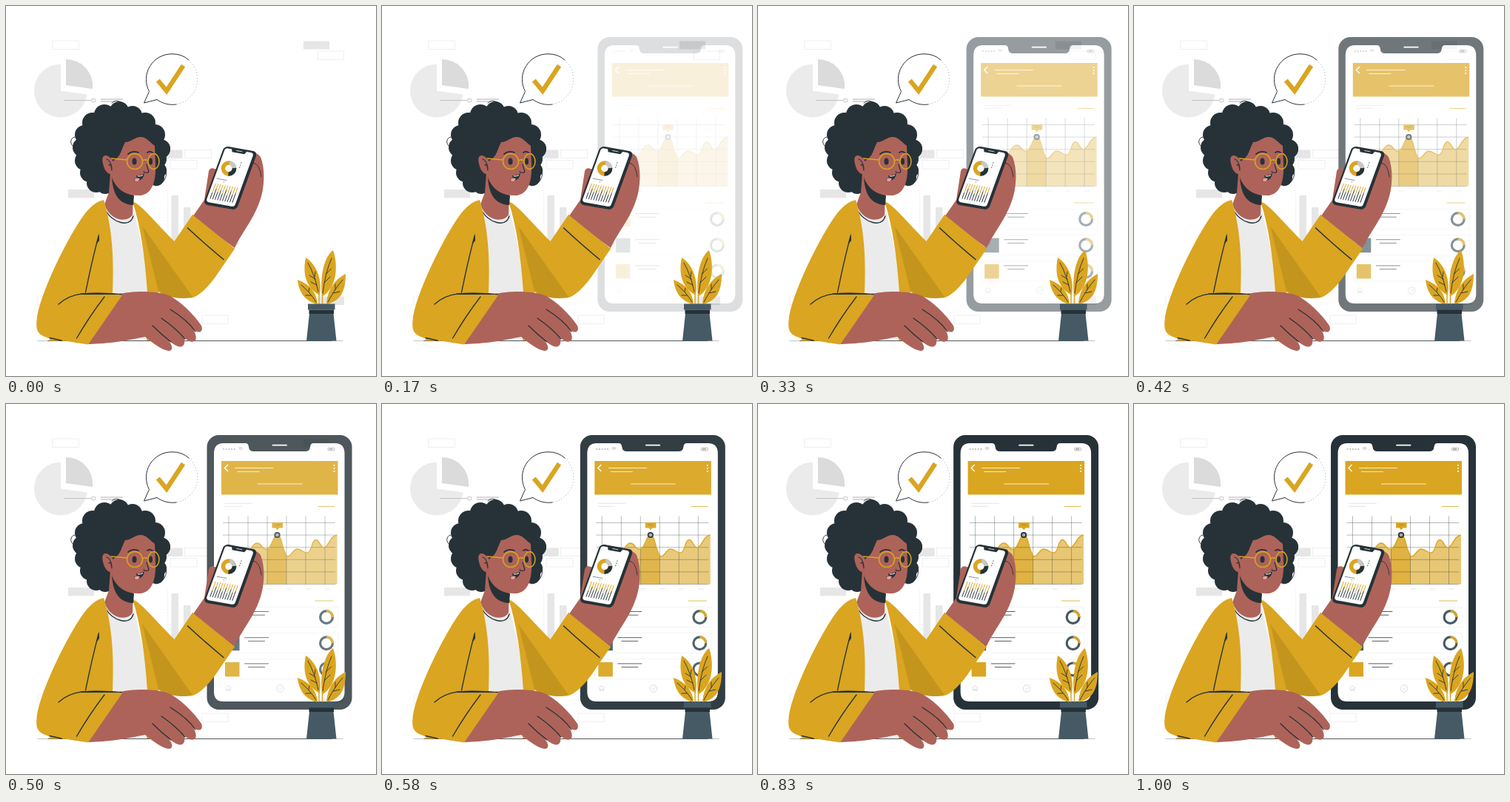
These frames come from a looping animation (500 by 500 pixels, 1.04 s). An HTML page:

```html
<!DOCTYPE html>
<html lang="en">
<head>
<meta charset="utf-8">
<title>Checking statistics</title>
<style>
  html, body { margin: 0; width: 100%; height: 100%; overflow: hidden; background: #fff; }
  svg { display: block; width: 100vw; height: 100vh; }
  .gold { fill: #daa520; }
  .dark { fill: #263238; }
  .slate { fill: #455a64; }
  .skin { fill: #ad6359; }
  .pale { fill: #ebebeb; }
  .white { fill: #fff; }
  .line { fill: none; stroke: #263238; stroke-linecap: round; stroke-linejoin: round; }
  .frame { fill: none; stroke: #e9e9e9; stroke-width: .7; }
  .tint { fill: none; stroke: #daa520; }
  .light { fill: none; stroke: #fff; }
</style>
</head>
<body>
<svg viewBox="0 0 500 500">
  <!-- backdrop -->
  <g class="pale">
    <path d="M74 78.5A36 36 0 1 0 109.6 119.5L74 114.5Z"/>
    <path d="M81 72A36 36 0 0 1 117 112L81 107Z" fill="#dbdbdb"/>
    <path d="M402 47.5h35v11h-35zM84 248h35v11.3H84zM203 194.5h35.5v11.5h-35.5zM422 392.5h35v11.5h-35z" fill="#e6e6e6"/>
    <path d="M223.5 256h9.5v62h-9.5zM240 272h9.5v46H240zM304 311h10v11.5h-10z" fill="#e6e6e6"/>
  </g>
  <path class="frame" d="M62.5 47H98.5V58.5H62.5zM421.5 61h35v11.5h-35zM241.5 194.5h36v11h-36zM222 208.5h36V220h-36zM265 418h35v11.5h-35zM43 392h36v12H43z"/>
  <path class="frame" d="M218.5 249V318" stroke-dasharray="2 2"/>
  <g fill="none" stroke="#bdbdbd" stroke-width=".9">
    <path d="M78 127.5h37.5"/><circle cx="118.3" cy="127.5" r="2.6"/>
    <path d="M128 126h30M128 129h19" stroke="#a6a6a6"/>
  </g>
  <path class="line" stroke-width=".7" d="M57 452.5H440"/>
  <path class="line" stroke-width=".3" d="M43 452.5H455"/>

  <!-- speech bubble -->
  <circle class="white" cx="224" cy="99" r="34.5"/>
  <path class="line" style="fill:#fff" d="M230 133C219 134.5 211 131 204 126.5L186.5 131L193.5 115.5A34.5 34.5 0 0 1 224 64.8Q238 64.5 247 73"/>
  <path class="line" stroke-width=".4" stroke-dasharray=".4 3.6" d="M247 73A34.5 34.5 0 0 1 230 133"/>
  <path class="tint" stroke-width="6.3" d="M205.3 100.5L217 114.8L239.5 80.5"/>

  <!-- large phone -->
  <g id="phone">
    <rect class="dark" x="266" y="42" width="196" height="371" rx="16"/>
    <path class="white" d="M288 53H318Q322 53 322.5 58Q323 64 329 64H399Q405 64 405.5 58Q406 53 410 53H439Q452 53 452 67V389Q452 402 439 402H288Q275.5 402 275.5 389V67Q275.5 53 288 53Z"/>
    <path class="light" stroke-width="1.8" stroke-linecap="round" d="M355 55.7H373.5"/>
    <g fill="none" stroke="#b5b5b5">
      <path stroke-width="2.2" stroke-linecap="round" stroke-dasharray="0 3.7" d="M288.5 61H304"/>
      <path d="M308.5 60Q311.5 57.5 314.5 60M310 61.5Q311.5 60.2 313 61.5"/>
      <rect x="429.5" y="59.3" width="9" height="3.6" rx="1"/><path stroke-width="2" d="M431 61.1h5"/>
    </g>
    <rect class="gold" x="285.5" y="77" width="157.5" height="45.5"/>
    <path class="light" stroke-width="1.5" d="M294.5 82L290 86.5L294.5 91"/>
    <path class="light" stroke-width=".8" d="M304 86.5h52M307 91.5h30M334 108h61"/>
    <path class="light" stroke-width="2.1" stroke-linecap="round" stroke-dasharray="0 4" d="M438 83v8.5"/>
    <path fill="none" stroke="#dadada" stroke-width=".7" d="M290 134.3h38M290 138.3h23M294 250h8M320 250h8M347 250h8M373 250h8M399 250h8M425 250h8"/>
    <path class="tint" stroke-width=".8" d="M416 138.5h22.5M412 266h25"/>

    <path class="gold" opacity=".62" d="M296 236C309 236 315 223 321 206C327 188 334 184 340 192C343 197 347 197 350 194C355 189 356 177 361 177C367 177 367 194 373.5 205C379 209 382 196 388 196C394 196 397 202 402 201C408 200 407 184 413 183.5C418 183 419 194 424 194C431 193 432 178 442 177V243.5H296Z"/>
    <path class="gold" opacity=".6" d="M347.5 196C355 192 355 177 361 177C367 177 367 194 373.5 205V243.5H347.5Z"/>
    <path class="line" id="grid" stroke-width=".35"/>
    <path class="tint" stroke-width="1.4" d="M296 236C309 236 315 223 321 206C327 188 334 184 340 192C343 197 347 197 350 194C355 189 356 177 361 177C367 177 367 194 373.5 205C379 209 382 196 388 196C394 196 397 202 402 201C408 200 407 184 413 183.5C418 183 419 194 424 194C431 193 432 178 442 177"/>
    <path class="gold" d="M354 160h14.5v7.5h-5l-2.4 3l-2.4-3H354z"/>
    <path fill="none" stroke="#8d6b16" stroke-width=".5" d="M358 163.5h6.5"/>
    <circle cx="361" cy="177" r="3.2" fill="#a9aba0" stroke="#263238" stroke-width="1.8"/>
    <g id="rows"></g>
    <g fill="none" stroke="#dcdcdc">
      <path d="M291 384L295 380.5L299 384M292.5 384v3.5h1.7v-2h1.8v2h1.7V384"/>
      <circle cx="365" cy="384.5" r="4.8"/><path d="M363 384.5l1.6 1.5l2.8-3"/>
    </g>
  </g>

  <!-- plant -->
  <g>
    <path class="gold" d="M427 393C424 364 430 339 442 330C449 350 448 380 427 393ZM424 391C404 380 401 360 405 340C419 348 428 370 424 391ZM433 403C435 382 444 370 459 362C459 386 452 399 433 403ZM421 403C404 399 396 387 394 370C411 376 420 388 421 403Z"/>
    <path class="tint" d="M423 389V403M427.5 389V403" stroke-width="1.5"/>
    <path class="line" stroke-width=".9" d="M428 388Q432 358 440 341M430 374l8-8M432.5 362l7-7M422 386Q417 363 408 347M418 369l-8-5M420 377l-8-4M417 366l1-7M435 400Q445 381 455 370M442 388l9-2M445 383l0-7M419 400Q411 387 399 377M412 391l-7 0M409 386l1-5"/>
    <path class="slate" d="M408 402.5h36.5v8H408zM410 415.5h32.5l4 37H406z"/>
    <path class="dark" d="M409.5 410.5h33.5v5.5h-33.5z"/>
  </g>

  <!-- torso -->
  <path class="pale" d="M133 268C142 293 166 294 172 272L196 380V446L188 452H140V330Z"/>
  <path class="gold" d="M171 264C183 269 193 283 227.5 318L252 282L309 328L283 366C272 381 260 393 250 394.5C235 396 218 394 206 386L205 452H190L191 388Q186 310 171 264Z"/>
  <path d="M184 297L252 393C235 397 218 394 206 385Z" fill="#c4951d"/>
  <path class="gold" d="M58 452.5L62 445H90L80 452.5Z"/>

  <!-- head -->
  <g id="hair" class="dark"><path d="M118 158L153 140L190 160L212 195L203 230L140 245L105 205Z"/></g>
  <path class="line" stroke-width=".9" d="M93 177C86 178 86 188 92 190M215 183C223 186 224 198 216 204M216 220C219 232 212 242 202 243M143 131Q149 125 157 131"/>
  <path class="skin" d="M144 208C134 197 128 203 131 213C133 223 138 228 145 228Z"/>
  <path class="skin" d="M141 225L139 252L133 268C141 292 165 293 171 282L172 250Z"/>
  <path class="dark" d="M143 232C149 247 160 254 173 256L172 269C154 268 145 257 143 232Z"/>
  <path class="skin" d="M143 211L148 207C155 202 156 194 161 184C169 184 174 177 182 177C190 177 194 184 201 189L202 214C203 238 197 254 182 256C164 257 150 249 144 232Z"/>
  <path class="line" stroke-width="1.2" d="M136 207Q141 208 143 219M139 215Q142 212 143 222"/>
  <ellipse class="dark" cx="173.5" cy="210" rx="3" ry="4.6"/>
  <ellipse class="dark" cx="195.5" cy="210" rx="2.6" ry="4.6"/>
  <path class="line" stroke-width="1.8" d="M165 200Q171 195 179 198M191 198Q195 195 199 199"/>
  <path class="line" stroke-width="1.2" d="M190 214L193 224Q190 227 186 224"/>
  <path class="dark" d="M176 229Q182 230 187 226Q186 235 178 236Q174 236 173 234Q178 233 176 229Z"/>
  <path fill="#e7a59c" d="M173.500 235Q176 231 181 233.500L178 237Q175 237 173.500 235Z"/>
  <path class="light" d="M178 230Q182 230.500 185 228.500"/>
  <g class="tint" stroke-width="1.5">
    <circle cx="174" cy="210" r="10.5"/><ellipse cx="199.5" cy="210" rx="7.5" ry="10.5"/>
    <path d="M142 206L164 208M184.5 209Q188 206.5 192 209"/>
  </g>
  <path class="line" stroke-width="1.4" d="M135 277C144 292 167 301 172 284"/>

  <!-- left arm -->
  <path class="skin" d="M150 390C172 384 207 385 222 392C240 402 257 421 264 432C267 439 262 443 256 439L253 437C257 444 259 452 253 453.5C248 455 243 450 240 447C243 454 241 461 235 460.5C229 460 224 455 219 451C225 459 227 465 220 466C211 465 199 456 188 447C176 449 150 456 110 457Z"/>
  <path class="gold" d="M132 262C115 266 104 283 92 303C71 338 43 399 41.500 425C40 440 44 445 60 449.500L111 457.500L157 391L144 388C146 345 144 300 132 262Z"/>
  <path class="line" stroke-width="1.3" d="M222 410Q246 425 256 440M210 422Q228 434 242 450M198 432Q210 444 223 454M125 311Q116 345 107.5 387M71 403C90 386 108 387 156 389.5M133 393Q113 419 95.5 449M59 448.5L75 452"/>
  <path class="dark" d="M125.5 307L126 317L122 322ZM100 388.8Q128 386 157 389.5Q128 390 100 390Z"/>

  <!-- right hand with small phone -->
  <path class="skin" d="M252 285L268 262L274 223Q276 217 283 220.5L325 202Q337 194 344 204C350 219 349 238 346.5 251C339 284 322 300 309 327Z"/>
  <path class="gold" d="M252 282L309 328L295 347L240 302Z"/>
  <path class="line" stroke-width="1.5" d="M245.5 300Q268 321 294 342.5"/>
  <path class="line" stroke-width=".9" d="M334 212Q343 213 345 231"/>
  <g transform="matrix(.978 .174 -.341 .939 295 189)">
    <rect class="dark" width="46" height="84" rx="6"/>
    <rect class="white" x="2.3" y="2.5" width="39.5" height="77.5" rx="4"/>
    <path class="dark" d="M11 2h21l-2 4.5H13z"/>
    <path class="light" stroke-width=".7" d="M18 3.5h8"/>
    <g id="bars" fill="none" stroke-width=".9"></g>
    <path class="line" stroke-width=".5" d="M6 46h13M16 49h1"/>
    <path class="line" stroke-width="1.3" stroke-dasharray="0 3.2" d="M30 19v7"/>
  </g>
  <g fill="none" stroke-width="5.6">
    <circle class="tint" cx="301" cy="219.5" r="7.5"/>
    <path stroke="#c7c7c7" d="M302 212A7.5 7.5 0 0 1 308.5 219"/>
    <path stroke="#263238" d="M308.5 219A7.5 7.5 0 0 1 300.5 227"/>
  </g>
</svg>
<script>
  const $ = id => document.getElementById(id);
  const add = (id, markup) => $(id).insertAdjacentHTML('beforeend', markup);

  const curls = [
    [153, 142, 13], [133, 147, 14], [117, 158, 14], [106, 174, 13], [103, 191, 13], [106, 209, 13],
    [113, 225, 13], [122, 239, 13], [134, 243, 11], [171, 148, 13], [188, 158, 14], [201, 174, 14],
    [209, 193, 13], [205, 207, 12], [206, 222, 11], [203, 232, 11]
  ];
  for (const [x, y, r] of curls) add('hair', `<circle cx="${x}" cy="${y}" r="${r}"/>`);

  let grid = '';
  for (let i = 0; i < 6; i++) grid += `M${295.5 + 26 * i} 152V243.5M288 ${160.5 + 16.6 * i}H439`;
  $('grid').setAttribute('d', grid);

  for (let i = 0; i < 3; i++) {
    const y = 288 + 35.2 * i;
    add('rows', `
      <rect x="286" y="${y - 13.5}" width="157" height="27" class="frame" style="stroke-width:.5"/>
      <rect x="290.5" y="${y - 9.5}" width="19.5" height="19.5" class="${i == 1 ? 'slate' : 'gold'}"/>
      <path class="line" stroke-width=".8" d="M317 ${y - 7.5}h32M322 ${y - 2.8}h22"/>
      <circle cx="427.5" cy="${y}" r="8.4" fill="none" stroke="#455a64" stroke-width="3.2"/>
      <path class="tint" stroke-width="3.2" d="M427.5 ${y - 8.4}a8.4 8.4 0 0 1 8.4 8.4"/>`);
  }

  for (let i = 0; i < 10; i++) {
    const x = 6.5 + 3.4 * i, mid = 66 - 5 * (i % 2) - i % 3;
    add('bars', `<path stroke="#daa520" d="M${x} 53V${mid}"/><path stroke="#263238" d="M${x} ${mid}V75"/>`);
  }

  // cubic-bezier(.36, -.01, .5, 1.38)
  function overshoot(x) {
    if (x >= 1) return 1;
    const curve = (a, b, s) => 3 * (1 - s) ** 2 * s * a + 3 * (1 - s) * s * s * b + s ** 3;
    let low = 0, high = 1;
    for (let i = 0; i < 24; i++) {
      const mid = (low + high) / 2;
      if (curve(.36, .5, mid) < x) low = mid; else high = mid;
    }
    return curve(-.01, 1.38, low);
  }

  const LOOP = 1040, RATE = 24, start = performance.now();
  function draw() {
    const time = (performance.now() - start) % LOOP;
    const step = Math.floor((time + 4) * RATE / 1000);
    const shown = step && overshoot((step + .95) / RATE); // hidden on the first step
    $('phone').setAttribute('transform', `translate(${30 * (1 - shown)} 0)`);
    $('phone').setAttribute('opacity', Math.min(1, shown));
    requestAnimationFrame(draw);
  }
  draw();
</script>
</body>
</html>
```
